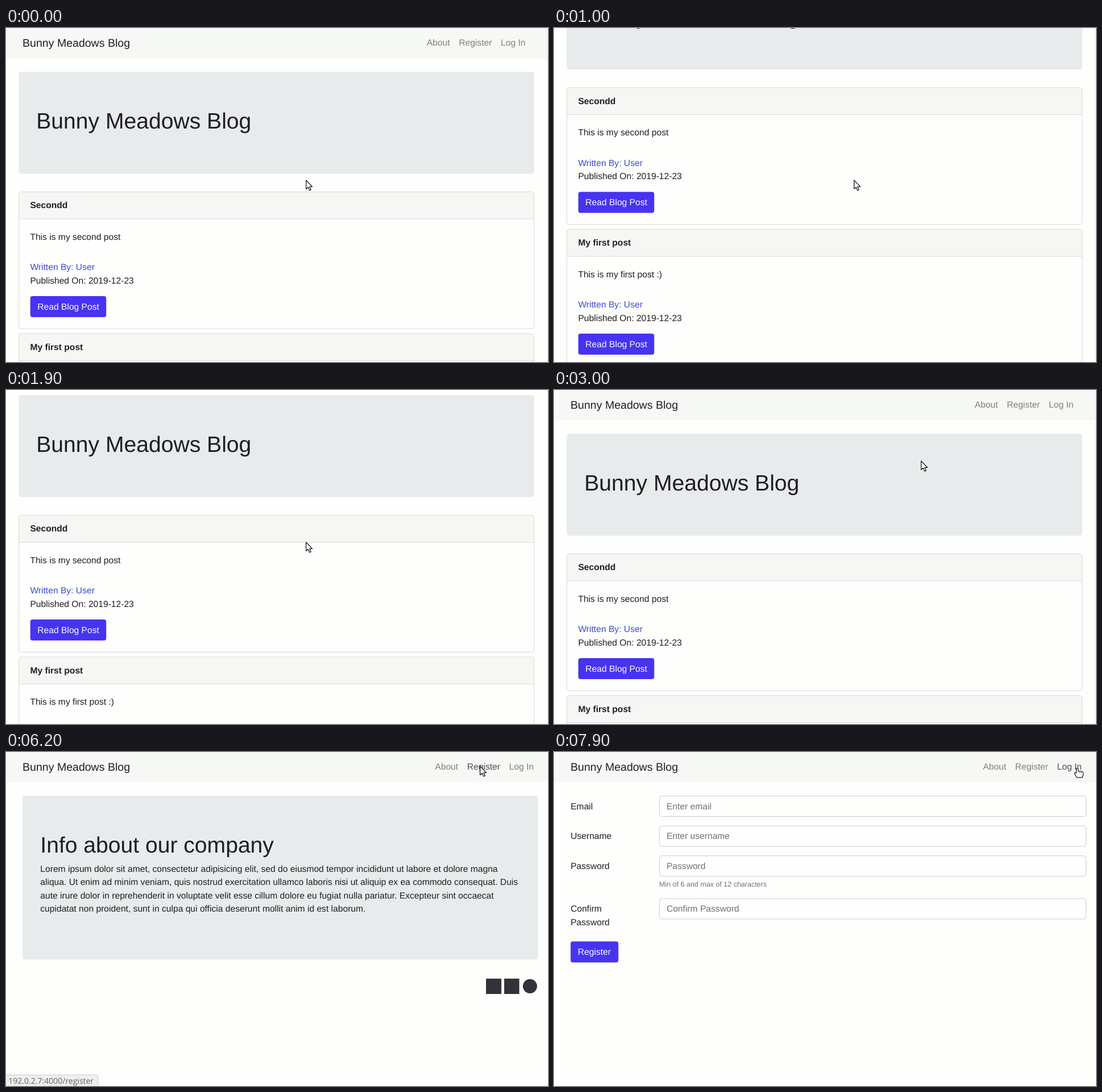
These frames come from a looping animation (953 px wide and 588 px high, 8000 ms). An HTML page:

```html
<!DOCTYPE html>
<html lang="en">
<head>
<meta charset="utf-8">
<style>
html, body { margin: 0; width: 100%; height: 100%; overflow: hidden; background: #fefefd; }
svg { display: block; width: 953px; height: 588px; }
text {
  font: 15.63px "Liberation Sans", Arial, sans-serif;
  fill: #211d21;
  text-rendering: geometricPrecision;
  white-space: pre;
}
.brand { font-size: 19.54px; }
.title { font-size: 39.08px; }
.bold { font-weight: bold; }
.small { font-size: 12.5px; fill: #6e7174; }
.hint { fill: #6e7174; }
.link { fill: #3a4cce; }
.light { fill: #fbfaff; }
.nav { fill: #7f807e; }
.nav.hover { fill: #504d50; }
.status { font: 14px "Open Sans", "Noto Sans", sans-serif; fill: #62615f; }
</style>
</head>
<body>
<svg id="stage" viewBox="0 0 953 588"></svg>
<script>
const LOOP = 8000;
const BRAND = 'Bunny Meadows Blog';
const HOST = '192.0.2.7:4000';
const LINE = 23.45;

const text = (x, y, str, cls = '') => `<text x="${x}" y="${y}" class="${cls}">${str}</text>`;
const box = (x, y, w, h, fill, r = 0, extra = '') =>
  `<rect x="${x}" y="${y}" width="${w}" height="${h}" rx="${r}" fill="${fill}" ${extra}/>`;
const button = (x, y, w, label) =>
  box(x, y, w, 37, '#4733f2', 4) + text(x + 12.6, y + 23.6, label, 'light');
const panel = (x, h) => box(x, 77, 906.5, h, '#e7ebeb', 4.5);

function navbar(x, width) {
  const links = [['About', 0], ['Register', 56.5], ['Log In', 130.3]];
  return box(0, 0, width, 53, '#f6f8f5') + text(29.1, 33.3, BRAND, 'brand') +
    links.map(([label, dx]) => text(x + dx, 31.4, label, 'nav')).join('');
}

function card(y, title, body) {
  return `<g transform="translate(0 ${y})">` +
    box(22.5, 0.5, 906, 241, '#fefefd', 4) +
    `<path d="M22.5 48V4.5a4 4 0 0 1 4-4H924.5a4 4 0 0 1 4 4V48Z" fill="#f6f6f4"/>` +
    box(22.5, 47.5, 906, 1, '#d9d9d7') +
    box(22.5, 0.5, 906, 241, 'none', 4, 'stroke="#d9d9d7"') +
    text(42.4, 29, title, 'bold') +
    text(42.4, 84.8, body) +
    text(42.4, 138.3, 'Written By: User', 'link') +
    text(42.4, 161.8, 'Published On: 2019-12-23') +
    button(42.7, 184, 133.5, 'Read Blog Post') + '</g>';
}

function field(y, label, hint) {
  const labels = label.split('|').map((s, i) => text(29.2, y + 23.6 + i * LINE, s)).join('');
  return labels + box(185.5, y + 0.5, 750, 36, '#fefefd', 4, 'stroke="#c9cbcc"') +
    text(197.9, y + 23.6, hint, 'hint');
}

const lorem = [
  'Lorem ipsum dolor sit amet, consectetur adipisicing elit, sed do eiusmod tempor incididunt ut labore et dolore magna',
  'aliqua. Ut enim ad minim veniam, quis nostrud exercitation ullamco laboris nisi ut aliquip ex ea commodo consequat. Duis',
  'aute irure dolor in reprehenderit in voluptate velit esse cillum dolore eu fugiat nulla pariatur. Excepteur sint occaecat',
  'cupidatat non proident, sunt in culpa qui officia deserunt mollit anim id est laborum.'
];

const home = '<g id="scroll">' + navbar(739.7, 951) + panel(22.3, 179.4) +
  text(53.3, 176.8, BRAND, 'title') +
  card(288, 'Secondd', 'This is my second post') +
  card(537.5, 'My first post', 'This is my first post :)') + '</g>' +
  box(951, 0, 1, 588, '#e9e9e7');

const info = navbar(754.3, 953) + panel(29.1, 288.5) +
  text(60.3, 176.8, 'Info about our company', 'title') +
  lorem.map((s, i) => text(60.3, 210.8 + i * LINE, s)).join('') +
  box(844, 399, 27, 27, '#32333a') + box(876, 399, 26.5, 27, '#32333a') +
  '<circle cx="921.3" cy="412.3" r="12.5" fill="#32333a"/>';

const form = navbar(754.3, 953) +
  field(77, 'Email', 'Enter email') +
  field(129.6, 'Username', 'Enter username') +
  field(182.2, 'Password', 'Password') +
  text(185, 237.3, 'Min of 6 and max of 12 characters', 'small') +
  field(257.5, 'Confirm|Password', 'Confirm Password') +
  button(29.2, 333.5, 84, 'Register');

const arrow = '<path d="M.6 1V16.4L4.2 13.2 6.7 19 9.2 17.9 6.8 12.3H11.6Z"/>';
const hand = '<path d="M-1.6 9V2Q-1.6 .6 0 .6T1.6 2V6H6Q10 6.3 10.4 8.3V12.5L9 16.8H-.8L-4.6 10.4Q-5 8.3-3.2 8.2Z"/>' +
  '<path d="M4.5 6.2V9M7.5 6.5V9" stroke-width=".8"/>';

const stage = document.getElementById('stage');
stage.innerHTML = [home, info, form].map(p => `<g class="page">${p}</g>`).join('') +
  '<g id="status"><path id="tab" fill="#efeeec" stroke="#cfcecc"/>' + text(4.3, 584, '', 'status') + '</g>' +
  '<g id="cursor" fill="#fff" stroke="#111" stroke-width="1.2" stroke-linejoin="round">' +
  `<g>${arrow}</g><g>${hand}</g></g>`;

const pages = [...stage.querySelectorAll('.page')];
const navs = pages.map(p => [...p.querySelectorAll('.nav')]);
const scroller = document.getElementById('scroll');
const status = document.getElementById('status');
const tab = document.getElementById('tab');
const address = status.querySelector('text');
const cursor = document.getElementById('cursor');

// [time, value...]: each value holds until the next time
const scrolls = [[0, 0], [700, 22], [800, 78], [900, 138], [1000, 183.5], [1100, 196],
  [1600, 186], [1700, 152], [1800, 110], [1900, 68], [2000, 29], [2100, 7], [2400, 0]];
const fades = [[0, 0], [3800, 0.5], [3900, 1], [4600, 0.15], [4800, 0],
  [5800, 0.4], [5900, 1], [6600, 0.5], [6700, 0.12], [6900, 0]];
const shown = [[0, 0], [4300, 1], [6400, 2]];

const glide = (start, n, [x0, y0], [x1, y1]) => Array.from({ length: n }, (_, i) => {
  const p = (i + 1) / n, e = p * p * (3 - 2 * p);
  return [start + i * 100, x0 + (x1 - x0) * e, y0 + (y1 - y0) * e];
});
const spots = [[0, 527, 267], [2700, 546, 246], [2800, 577, 208], [2900, 611, 165],
  [3000, 645, 124], [3100, 677, 92], [3200, 706, 64], [3300, 730, 42], [3400, 747, 28],
  [3500, 758, 20], [3600, 766, 18.5],
  ...glide(5000, 9, [766, 18.5], [833, 24]),
  ...glide(7200, 8, [833, 24], [920, 28])];

const at = (table, t) => table.findLast(row => row[0] <= t).slice(1);
const within = (t, ...spans) => spans.some(([a, b]) => t >= a && t < b);

function draw(t) {
  const [page] = at(shown, t);
  const [x, y] = at(spots, t);
  const [fade] = at(fades, t);
  pages.forEach((p, i) => p.setAttribute('display', i === page ? 'inline' : 'none'));
  scroller.setAttribute('transform', `translate(0 ${-at(scrolls, t)[0]})`);

  const over = within(t, [3400, 4300], [5000, 6400], [7200, LOOP]);
  const target = x < 803 ? 0 : x < 877 ? 1 : 2;
  navs[page].forEach((n, i) => n.classList.toggle('hover', over && i === target));

  const early = t < 5400;
  const w = early ? 137 : 162.5;
  address.textContent = HOST + (early ? '/info' : '/register');
  tab.setAttribute('d', `M-1 568.5H${w - 4.5}q4 0 4 4V589H-1Z`);
  status.setAttribute('opacity', fade);

  const pointing = t >= 3400 && !within(t, [4100, 4300], [6200, 6400]);
  cursor.setAttribute('transform', `translate(${x} ${y})`);
  cursor.children[0].setAttribute('display', pointing ? 'none' : 'inline');
  cursor.children[1].setAttribute('display', pointing ? 'inline' : 'none');
}

function tick() {
  draw(performance.now() % LOOP);
  requestAnimationFrame(tick);
}
tick();
</script>
</body>
</html>
```
